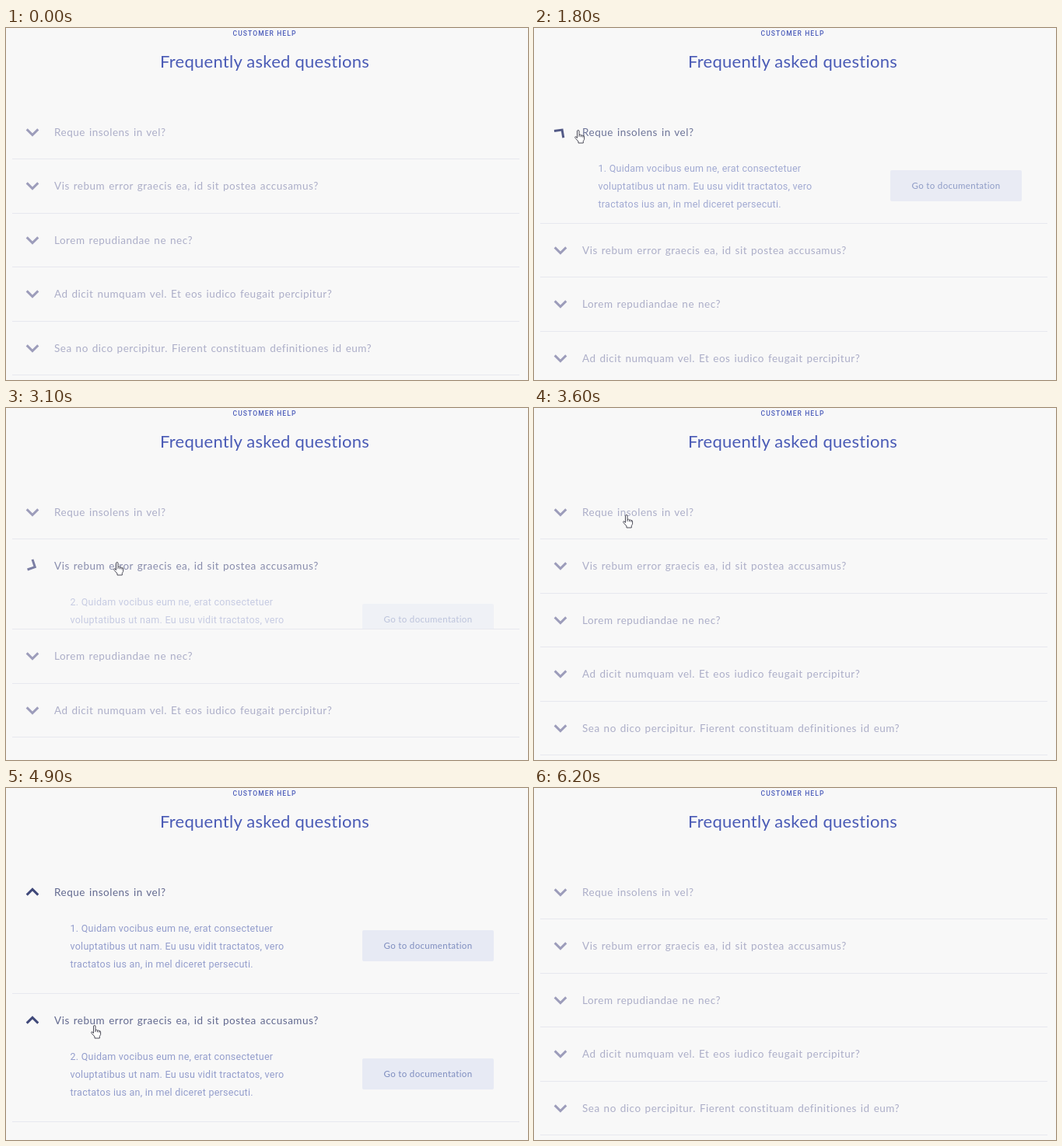
Recreate the animation shown at these times as an HTML page. Size 671 px wide and 453 px high, loop 6.4 s.

```html
<!DOCTYPE html>
<html lang="en">
<head>
<meta charset="utf-8">
<title>Frequently asked questions</title>
<style>
  html, body { margin: 0; width: 100%; height: 100%; overflow: hidden; }
  body { position: relative; background: #f8f8f8; white-space: nowrap; font-family: Lato, sans-serif; }
  .kicker, h1, .list, .question, .answer, .button, svg { position: absolute; margin: 0; }
  .kicker { left: 291.5px; top: 0; font: 500 8.5px/14px Roboto, sans-serif; letter-spacing: 1.1px; color: #4b5cba; }
  h1 { left: 198px; top: 27px; font-size: 22px; font-weight: 400; line-height: 31px; letter-spacing: .26px; color: #4a5bb6; }
  .list { left: 8px; top: 99.75px; width: 652px; }
  .item { position: relative; border-bottom: 1px solid #e7e8ef; }
  .header { height: 68.5px; }
  .question { left: 54px; top: 0; font-size: 13.5px; line-height: 68px; letter-spacing: .51px; word-spacing: 1px; }
  .chevron { left: 16px; top: 24px; fill: none; stroke: currentColor; stroke-width: 3; }
  .panel { position: relative; height: 0; overflow: hidden; }
  .answer { left: 74.5px; top: .7px; font: 12.5px/23px Roboto, sans-serif; letter-spacing: .25px; color: #939dcc; }
  .button { left: 450px; top: 14.5px; width: 169px; height: 40.5px; border-radius: 2px; background: #e7eaf4;
    font-size: 11.5px; line-height: 40px; letter-spacing: .33px; text-align: center; color: #7e8dbf; }
  #cursor { left: 0; top: 0; overflow: visible; fill: #fff; stroke: #4c4c58; stroke-linejoin: round; }
</style>
</head>
<body>
<div class="kicker">CUSTOMER HELP</div>
<h1>Frequently asked questions</h1>
<div class="list"></div>
<svg id="cursor" width="16" height="20">
  <path id="arrow" d="M.5 .5V12L3.2 9.5 5 13.5 6.8 12.7 5 8.8H8.5Z"/>
  <path id="hand" d="M3.5 10.5V2Q3.5 .5 4.8 .5T6 2V6.5Q8 5.7 8.5 7 10.3 6.4 10.8 7.7 12.6 7.2 12.6 9V12.5L11.3 14.5V17H5V15L1 10.5Q.2 8.8 1.7 8.7Z M6 6.5V9 M8.5 7V9.3 M10.8 7.7V9.7"/>
</svg>
<script>
const LOOP = 6400, STEP = 100, PANEL_HEIGHT = 95.5, PANEL_MS = 500, CHEVRON_MS = 400;
const questions = [
  'Reque insolens in vel?',
  'Vis rebum error graecis ea, id sit postea accusamus?',
  'Lorem repudiandae ne nec?',
  'Ad dicit numquam vel. Et eos iudico feugait percipitur?',
  'Sea no dico percipitur. Fierent constituam definitiones id eum?'
];
// Click times per item, alternately opening and closing it.
const clicks = [[1050, 1737, 3650, 5600], [2375, 2950, 4350, 5050], [], [], []];
// Pointer path: time, x, y.
const path = [
  [200, 655, 8], [300, 561, 31], [600, 96, 107], [700, 65, 116], [800, 52, 131],
  [1800, 52, 131], [2200, 138, 198], [3200, 138, 198], [3600, 114, 137],
  [3950, 114, 137], [4200, 109, 305], [5200, 109, 305], [5500, 112, 137],
  [5800, 112, 137], [6200, 671, 3]
];

const list = document.querySelector('.list');
const items = questions.map((text, i) => {
  const item = document.createElement('div');
  item.className = 'item';
  item.innerHTML = `<div class="header">
      <svg class="chevron" width="20" height="20"><path d="M-7.3 -3.6L0 3.6 7.3 -3.6"/></svg>
      <div class="question">${text}</div>
    </div>
    <div class="panel">
      <div class="answer">${i + 1}. Quidam vocibus eum ne, erat consectetuer<br>voluptatibus ut nam. Eu usu vidit tractatos, vero<br>tractatos ius an, in mel diceret persecuti.</div>
      <div class="button">Go to documentation</div>
    </div>`;
  list.append(item);
  const find = selector => item.querySelector(selector);
  return { chevron: find('.chevron'), mark: find('path'), question: find('.question'), panel: find('.panel'), clicks: clicks[i] };
});
const [cursor, arrow, hand] = ['cursor', 'arrow', 'hand'].map(id => document.getElementById(id));

const mix = (a, b, k) => a + (b - a) * k;
const mixColor = (a, b, k) => `rgb(${a.map((v, i) => Math.round(mix(v, b[i], k)))})`;

// cubic-bezier(.25, .1, .25, 1)
function ease(x) {
  if (x >= 1) return 1;
  let low = 0, high = 1, s;
  for (let i = 0; i < 20; i++) {
    s = (low + high) / 2;
    if (.75 * s * (1 - s) + s ** 3 < x) low = s; else high = s;
  }
  return .3 * s * (1 - s) ** 2 + 3 * s * s * (1 - s) + s ** 3;
}

function openness(times, t, duration) {
  const past = times.filter(click => click <= t);
  if (!past.length) return 0;
  const k = ease((t - past.at(-1)) / duration);
  return past.length % 2 ? k : 1 - k;
}

function drawItem(item, t) {
  const open = openness(item.clicks, t, PANEL_MS);
  const turn = openness(item.clicks, t, CHEVRON_MS);
  item.panel.style.height = open * PANEL_HEIGHT + 'px';
  item.panel.style.opacity = open;
  item.question.style.color = mixColor([172, 174, 200], [98, 105, 143], open);
  item.chevron.style.color = mixColor([157, 157, 187], [64, 73, 122], turn);
  item.mark.setAttribute('transform', `translate(10 10) rotate(${-180 * turn})`);
}

function drawCursor(t) {
  const next = path.findIndex(point => point[0] > t);
  cursor.style.display = next > 0 ? '' : 'none';
  if (next <= 0) return;
  const [a, b] = [path[next - 1], path[next]];
  const k = (t - a[0]) / (b[0] - a[0]);
  cursor.style.transform = `translate(${mix(a[1], b[1], k)}px, ${mix(a[2], b[2], k)}px)`;
  const pointing = t >= 900 && t < 5900;
  hand.style.display = pointing ? '' : 'none';
  arrow.style.display = pointing ? 'none' : '';
}

const start = performance.now();
function draw() {
  const elapsed = (performance.now() - start) % LOOP;
  const t = Math.floor(elapsed / STEP) * STEP;
  items.forEach(item => drawItem(item, t));
  drawCursor(t);
  requestAnimationFrame(draw);
}
draw();
</script>
</body>
</html>
```
